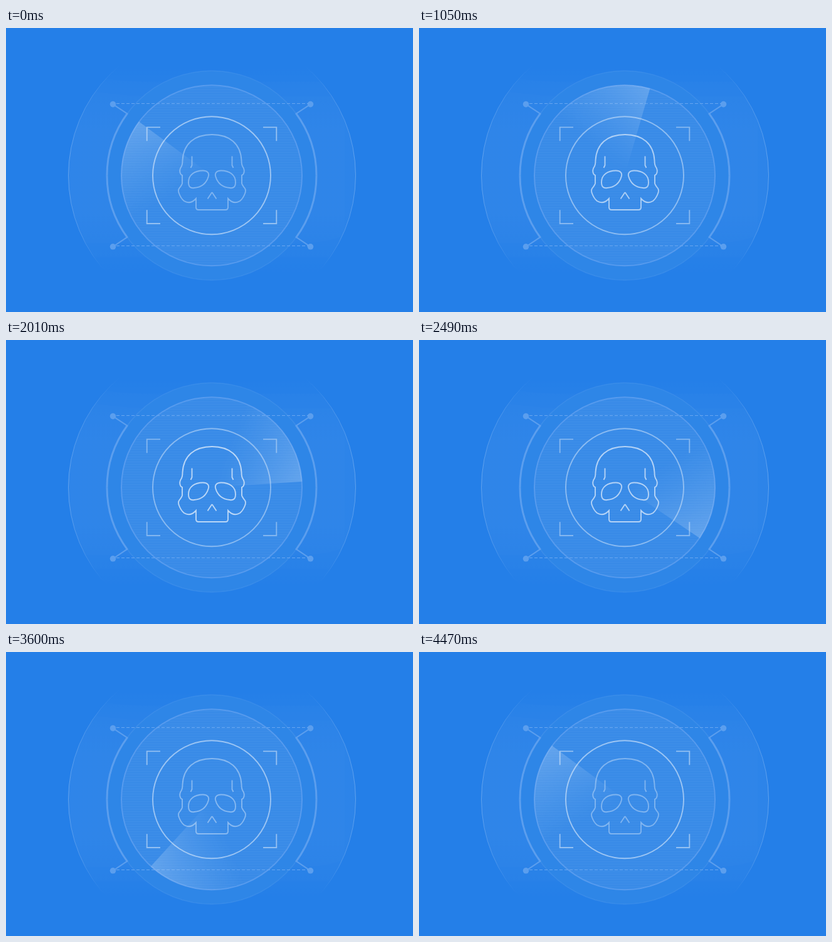
An HTML page with a canvas that plays this animation: 649 by 453 pixels, repeating every 4500 ms.

```html
<!DOCTYPE html>
<html lang="en">
<head>
<meta charset="utf-8">
<title>Threat scan</title>
<style>
  html, body { margin: 0; width: 100%; height: 100%; overflow: hidden; background: #247fe8; }
  canvas { display: block; }
</style>
</head>
<body>
<canvas id="stage" width="649" height="453"></canvas>
<script>
const W = 649, H = 453, CX = 328, CY = 235.2, TAU = Math.PI * 2;
const LOOP = 4500, STEP = 30;
const SCAN_RADIUS = 144.5, TRAIL = 64 / 360;
const ctx = document.getElementById('stage').getContext('2d');
const white = a => `rgba(255,255,255,${a})`;
const rad = deg => deg * Math.PI / 180;

function makeLayer(width, height, paint) {
  const layer = document.createElement('canvas');
  layer.width = width;
  layer.height = height;
  paint(layer.getContext('2d'));
  return layer;
}

function circle(g, x, y, r, fill, stroke, width) {
  g.beginPath();
  g.arc(x, y, r, 0, TAU);
  if (fill) { g.fillStyle = fill; g.fill(); }
  if (stroke) { g.strokeStyle = stroke; g.lineWidth = width; g.stroke(); }
}

function verticalFade(g, stops) {
  const fade = g.createLinearGradient(0, 60, 0, 396);
  for (const [at, alpha] of stops) fade.addColorStop(at, white(alpha));
  return fade;
}

// Calls draw once in each quadrant, mirrored around the centre.
function inQuadrants(g, draw) {
  for (const sx of [-1, 1]) for (const sy of [-1, 1]) {
    g.save();
    g.translate(CX, CY);
    g.scale(sx, sy);
    draw(g);
    g.restore();
  }
}

function paintHalo(g) {
  g.save();
  g.beginPath();
  g.arc(CX + .5, CY, 229, 0, TAU);
  g.clip();
  g.fillStyle = verticalFade(g, [[0, 0], [.1, .016], [.3, .033], [.7, .033], [.9, .012], [1, 0]]);
  g.fillRect(0, 60, W, 336);
  g.fillStyle = white(.009);
  g.fill(new Path2D('M150 80Q200 87 260 86H540V366H90V80Z'));
  g.fill(new Path2D('M140 101Q190 109 250 109H580V300Q550 343 470 343H70V101Z'));
  g.restore();
  circle(g, CX + .5, CY, 229, null,
    verticalFade(g, [[0, 0], [.15, .16], [.5, .27], [.8, .18], [.97, 0], [1, 0]]), 1);
}

function paintDisc(g) {
  circle(g, CX, CY, 167, 'rgb(46,134,231)', white(.07), 1.5);
  circle(g, CX, CY, 144, 'rgb(60,141,232)');
  g.save();
  g.clip();
  g.fillStyle = 'rgba(32,122,226,.2)';
  for (let y = 92; y < 380; y += 4) g.fillRect(180, y, 296, 1);
  g.restore();
  circle(g, CX, CY, 144, null, 'rgb(87,155,238)', 2);
}

function paintFrame(g) {
  const tone = 'rgb(91,158,238)';
  g.strokeStyle = tone;
  g.fillStyle = tone;
  inQuadrants(g, g => {
    g.lineWidth = 3;
    g.beginPath();
    g.arc(0, 0, 167, 0, rad(36.5));
    g.stroke();
    g.lineWidth = 2;
    g.beginPath();
    g.moveTo(157.5, 113.6);
    g.lineTo(134, 98);
    g.stroke();
    g.beginPath();
    g.arc(157.5, 113.6, 4.8, 0, TAU);
    g.fill();
  });
  g.lineWidth = 1;
  g.strokeStyle = 'rgb(104,166,240)';
  g.setLineDash([5, 3]);
  for (const y of [120.5, 347.5]) {
    g.beginPath();
    g.moveTo(176, y);
    g.lineTo(482, y);
    g.stroke();
  }
}

const backdrop = makeLayer(W, H, g => {
  g.fillStyle = '#247fe8';
  g.fillRect(0, 0, W, H);
  paintHalo(g);
  paintDisc(g);
  paintFrame(g);
});

// The beam's leading edge lies on the positive x axis.
const beam = makeLayer(300, 300, g => {
  const sweep = g.createConicGradient(0, 150, 150);
  sweep.addColorStop(0, white(0));
  sweep.addColorStop(1 - TRAIL, white(0));
  sweep.addColorStop(1, white(.21));
  circle(g, 150, 150, SCAN_RADIUS, sweep);
  const reach = g.createRadialGradient(150, 150, 10, 150, 150, SCAN_RADIUS);
  reach.addColorStop(0, white(0));
  reach.addColorStop(1, white(1));
  g.globalCompositeOperation = 'destination-in';
  g.fillStyle = reach;
  g.fillRect(0, 0, 300, 300);
});

// Left half; the right half is its mirror image.
const skullHalf = new Path2D(
  'M328.5 170C300 170 283 185 281.5 211Q281.5 219 279 222Q276 227 278 232Q278.500 234 281 235' +
  'V248Q280 251 276 256Q274 259 276 264Q279 272 284 276Q294 282 303 272' +
  'V286Q303 290 307 290H328.5' +
  'M296.500 204.500V219L294.500 223' +
  'M291 246C291 234 301 227.500 314 227.500C321 227.500 324 231 323 236' +
  'C320 247 313 254 300 255C294 256 291 253 291 246Z' +
  'M321.500 272.500L328.500 262');

function paintSkull(alpha) {
  ctx.strokeStyle = white(alpha);
  ctx.lineWidth = 1.9;
  // Both halves go into one path so that the seam is not drawn twice.
  const whole = new Path2D(skullHalf);
  whole.addPath(skullHalf, new DOMMatrix([-1, 0, 0, 1, 657, 0]));
  ctx.stroke(whole);
}

function paintTarget(alpha) {
  circle(ctx, CX, CY, 94, null, white(alpha), 1.9);
  ctx.lineWidth = 1.9;
  ctx.strokeStyle = white(alpha * .92);
  inQuadrants(ctx, g => {
    g.beginPath();
    g.moveTo(103.3, 55);
    g.lineTo(103.3, 76.8);
    g.lineTo(82, 76.8);
    g.stroke();
  });
}

// Cubic Bézier timing (.25, .1, .25, 1)
function ease(p) {
  const curve = (s, a, b) => 3 * (1 - s) * (1 - s) * s * a + 3 * (1 - s) * s * s * b + s * s * s;
  let lo = 0, hi = 1;
  for (let i = 0; i < 20; i++) {
    const mid = (lo + hi) / 2;
    if (curve(mid, .25, .25) < p) lo = mid; else hi = mid;
  }
  return curve(lo, .1, 1);
}

const sweepKeys = [[0, 0], [1500, 99.6], [3000, 217.7], [4470, 360]];

function sweepAngle(t) {
  let i = 1;
  while (i < sweepKeys.length - 1 && t > sweepKeys[i][0]) i++;
  const [t0, a0] = sweepKeys[i - 1], [t1, a1] = sweepKeys[i];
  return 216.5 + a0 + (a1 - a0) * Math.min(1, (t - t0) / (t1 - t0));
}

function draw(now) {
  const t = Math.floor(now % LOOP / STEP) * STEP;
  const half = LOOP / 2;
  const glow = t < half ? ease(t / half) : 1 - ease((t - half) / half);
  ctx.drawImage(backdrop, 0, 0);
  ctx.save();
  ctx.translate(CX, CY);
  ctx.rotate(rad(sweepAngle(t)));
  ctx.drawImage(beam, -150, -150);
  ctx.restore();
  paintTarget(.5 - .1 * glow);
  paintSkull(.35 + .3 * glow);
}

const start = performance.now();
function tick() {
  draw(performance.now() - start);
  requestAnimationFrame(tick);
}
tick();
</script>
</body>
</html>
```
